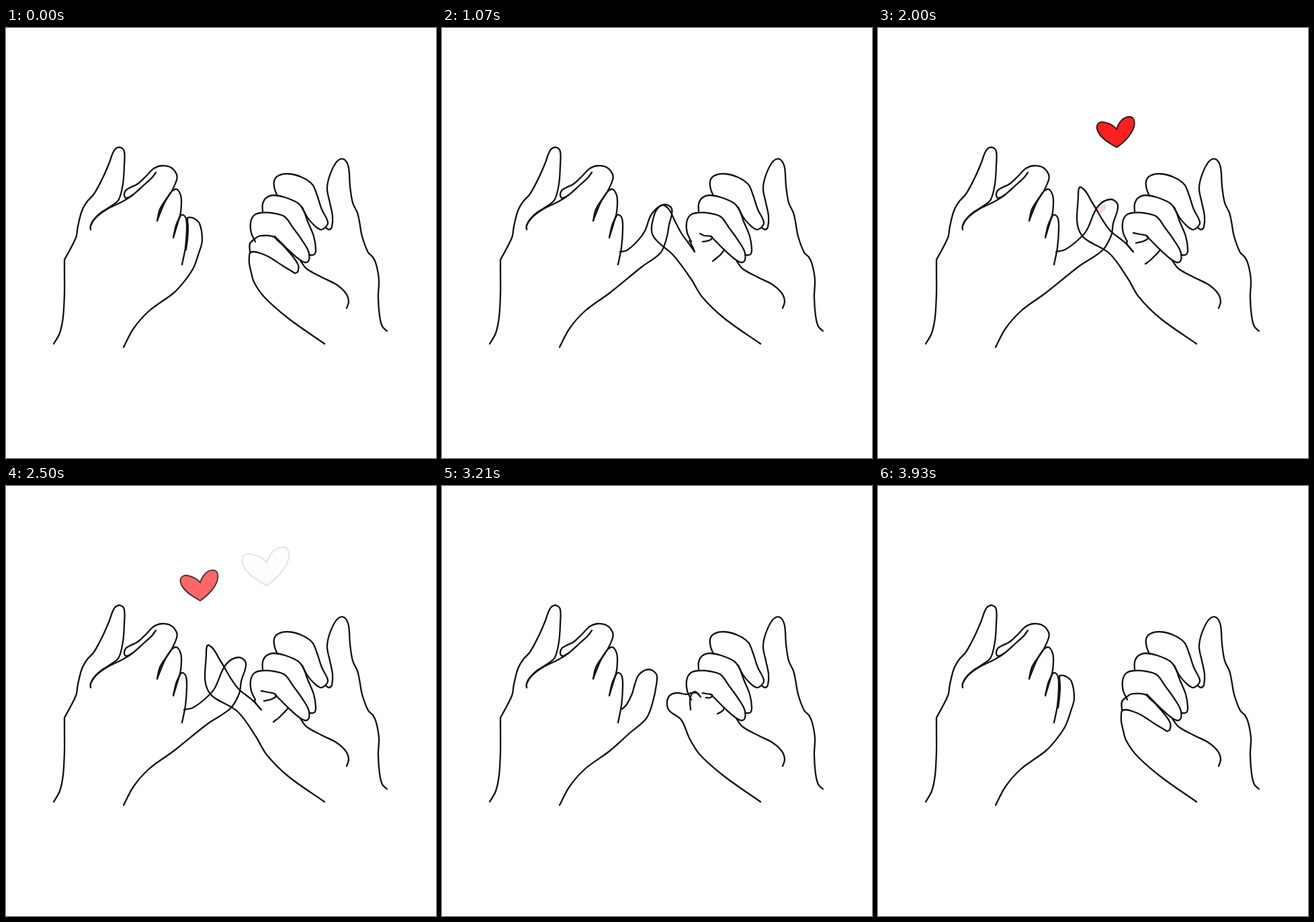
Recreate the animation shown at these times as an HTML page with a canvas. Size 640 by 640 pixels, loop 4.21 s.

```html
<!DOCTYPE html>
<html lang="en">
<head>
<meta charset="utf-8">
<title>Pinky promise</title>
<style>
  html, body { margin: 0; width: 100%; height: 100%; overflow: hidden; background: #fff; }
  canvas { display: block; }
</style>
</head>
<body>
<canvas id="stage" width="640" height="640"></canvas>
<script>
const ctx = document.getElementById('stage').getContext('2d');
const LOOP = 4210, FPS = 14;

const points = text => text.split(' ').map(pair => pair.split(',').map(Number));
const clamp = v => Math.max(0, Math.min(1, v));
const mix = (a, b, k) => a + (b - a) * k;
const easeInOut = u => u < .5 ? 2 * u * u : 1 - 2 * (1 - u) ** 2;

// Lines that never move
const still = [
  // left hand: wrist, thumb, index, middle, ring
  '71,470 80,454 85,430 87,395 87,365 87,345',
  '87,345 104,312 107,295 113,272 121,258 131,247 144,223 154,200 159,186 164,179 171,178 176,184 176,205 174,232 168,255 158,264 141,275 130,286 126,294 126,300',
  '126,300 126,294 134,282 150,270 174,258 188,249 206,233 217,223 223,215',
  '188,249 179,253 176,249 178,242 184,238 196,232 209,220 220,209 232,205 246,208 254,218 254,226 247,242 237,258 230,274 225,287',
  '225,287 229,270 239,254 247,243 254,240 260,249 261,262 259,279 253,294 249,312',
  '249,312 254,296 259,281 263,278 268,284 269,300 267,327 262,352',
  // right hand: wrist and thumb, index, middle, ring, palm
  '567,451 560,444 556,428 554,400 555,375 551,352 546,341 539,334 530,310 526,288 523,275 516,260 512,235 510,208 505,197 498,195 490,202 481,222 478,240 482,260 486,280 485,296 481,300 476,297',
  '404,250 400,240 399,228 405,220 420,217 440,222 456,233 463,249 470,270 479,289 475,297 468,300 457,292 448,281 441,267',
  '382,273 382,262 387,253 398,249 415,252 435,261 443,272 449,288 458,310 461,329 459,337 451,338',
  '371,318 365,305 364,290 369,279 380,275 400,276 415,281 427,297 440,315 450,332 451,345 446,349 436,344 420,330 409,319 400,310',
  '438,346 447,358 470,371 492,382 506,395 510,407 507,417'
].map(points);

// Moving lines: one pose per entry of openness
const openness = [0, .138, .5, .729, 1];

const leftPinky = {
  poses: [
    '268,330 270,315 271,298 270,284 271,282 279,283 288,291 292,316 287,335 279,357 267,375 250,394',
    '269,325 272,312 274,300 274,288 276,283 285,281 295,287 298,313 292,338 285,355 270,374 250,394',
    '268,332 275,325 283,309 287,295 293,281 307,273 319,280 319,296 313,324 304,346 279,368 250,394',
    '265,333 275,331 291,317 302,302 312,277 329,263 342,269 338,293 334,314 325,335 298,355 250,394',
    '265,333 278,330 296,317 310,302 327,266 346,255 357,264 350,291 347,309 334,331 300,354 250,394'
  ].map(points),
  tail: points('213,421 190,447 175,475')
};

const rightPinky = {
  poses: [
    '430,365 412,354 392,341 378,335 368,333 363,335 362,341 362,350 365,364 369,378 384,400',
    '418,352 403,347 386,338 374,331 366,328 359,328 356,334 356,343 363,359 368,377 384,400',
    '384,313 379,308 372,308 363,310 351,308 340,311 335,321 338,334 356,348 369,377 384,400',
    '376,333 366,319 356,305 346,286 337,269 326,264 315,281 314,309 345,339 371,374 387,400',
    '380,333 366,318 347,303 335,287 319,260 302,237 298,250 301,305 345,336 372,373 388,400'
  ].map(points),
  tail: points('420,432 474,470')
};

const fold = {
  poses: [
    '363,333 363,321 370,314 376,310 384,309',
    '364,333 365,321 371,313 377,309 384,308',
    '370,333 369,320 371,311 377,306 385,314',
    '376,333 374,328 371,322 370,319 368,317',
    '380,333 378,331 374,326 371,322 370,319'
  ].map(points)
};

const crease = {
  poses: [
    '384,309 391,309 399,311 405,317 411,322',
    '384,308 390,309 395,311 400,315 405,318',
    '388,308 393,309 402,311 399,315 393,315',
    '384,306 390,309 402,311 398,316 388,318',
    '380,305 390,307 402,311 396,317 384,320'
  ].map(points)
};

const fingertip = {
  poses: [
    '411,322 426,339 435,353 434,363 430,365',
    '405,318 417,332 423,345 422,351 418,352',
    '420,330 419,333 417,335 414,337 410,339',
    '420,330 418,333 414,338 409,342 403,347',
    '420,330 417,334 412,339 406,345 398,351'
  ].map(points)
};

const moving = [leftPinky, rightPinky, fold, crease, fingertip];

// Tip travels from a shared start to (x, y); bend shapes the sideways drift
const hearts = [
  { start: 21, x: 388, y: 148, bend: 1.27, fadeAt: .5 },
  { start: 28, x: 243, y: 139, bend: 1.05, fadeAt: .38 }
];
const heartShape = new Path2D(
  'M0 0C-13-7-27-16-28.5-28C-28.5-36-22-37-17-36C-9-34-3-30 0-26' +
  'C2-34 9-44 18-44C24-44 26-39 25.5-34C25-22 12-8 0 0Z');

// Smooth line through all points, handles scaled to each segment
function drawSpline(pts) {
  const last = pts.length - 1;
  const direction = i => {
    const [ax, ay] = pts[Math.max(0, i - 1)], [bx, by] = pts[Math.min(last, i + 1)];
    const length = Math.hypot(bx - ax, by - ay) || 1;
    return [(bx - ax) / length, (by - ay) / length];
  };
  ctx.beginPath();
  ctx.moveTo(...pts[0]);
  for (let i = 0; i < last; i++) {
    const [ax, ay] = pts[i], [bx, by] = pts[i + 1];
    const [ux, uy] = direction(i), [vx, vy] = direction(i + 1);
    const h = Math.hypot(bx - ax, by - ay) / 3;
    ctx.bezierCurveTo(ax + ux * h, ay + uy * h, bx - vx * h, by - vy * h, bx, by);
  }
  ctx.stroke();
}

function poseAt({ poses, tail = [] }, open) {
  let i = 0;
  while (i < openness.length - 2 && open > openness[i + 1]) i++;
  const k = (open - openness[i]) / (openness[i + 1] - openness[i]);
  const blended = poses[i].map(([x, y], j) =>
    [mix(x, poses[i + 1][j][0], k), mix(y, poses[i + 1][j][1], k)]);
  return blended.concat(tail);
}

function drawHeart({ start, x, y, bend, fadeAt }, step) {
  const p = (step - start) / 14;
  if (p < 0 || p > 1) return;
  const rise = 1 - (1 - p) ** 2.1;
  const fade = clamp((p - fadeAt) / (1 - fadeAt));
  const alpha = Math.min(1, .4 + 3 * p) * (1 - .9 * fade);
  const size = mix(14, 70, 1 - (1 - p) ** 2) / 54;
  ctx.save();
  ctx.translate(mix(332, x, p ** bend), mix(275, y, rise));
  ctx.scale(size, size);
  ctx.lineWidth = 1.8;
  ctx.fillStyle = '#ff1f1f';
  ctx.strokeStyle = '#1c1c1c';
  ctx.globalAlpha = alpha * alpha;
  ctx.fill(heartShape);
  ctx.globalAlpha = alpha;
  ctx.stroke(heartShape);
  ctx.restore();
}

function draw(now) {
  const step = Math.floor((now % LOOP) * FPS / 1000 + .07);
  const open = step < 29
    ? easeInOut(clamp((step - 3) / 19))
    : 1 - easeInOut(clamp((step - 35) / 20));

  ctx.fillStyle = '#fff';
  ctx.fillRect(0, 0, 640, 640);
  ctx.strokeStyle = '#111';
  ctx.lineWidth = 2.3;
  ctx.lineCap = ctx.lineJoin = 'round';
  still.forEach(drawSpline);
  moving.forEach(part => drawSpline(poseAt(part, open)));
  hearts.forEach(heart => drawHeart(heart, step));
  requestAnimationFrame(draw);
}
requestAnimationFrame(draw);
</script>
</body>
</html>
```
